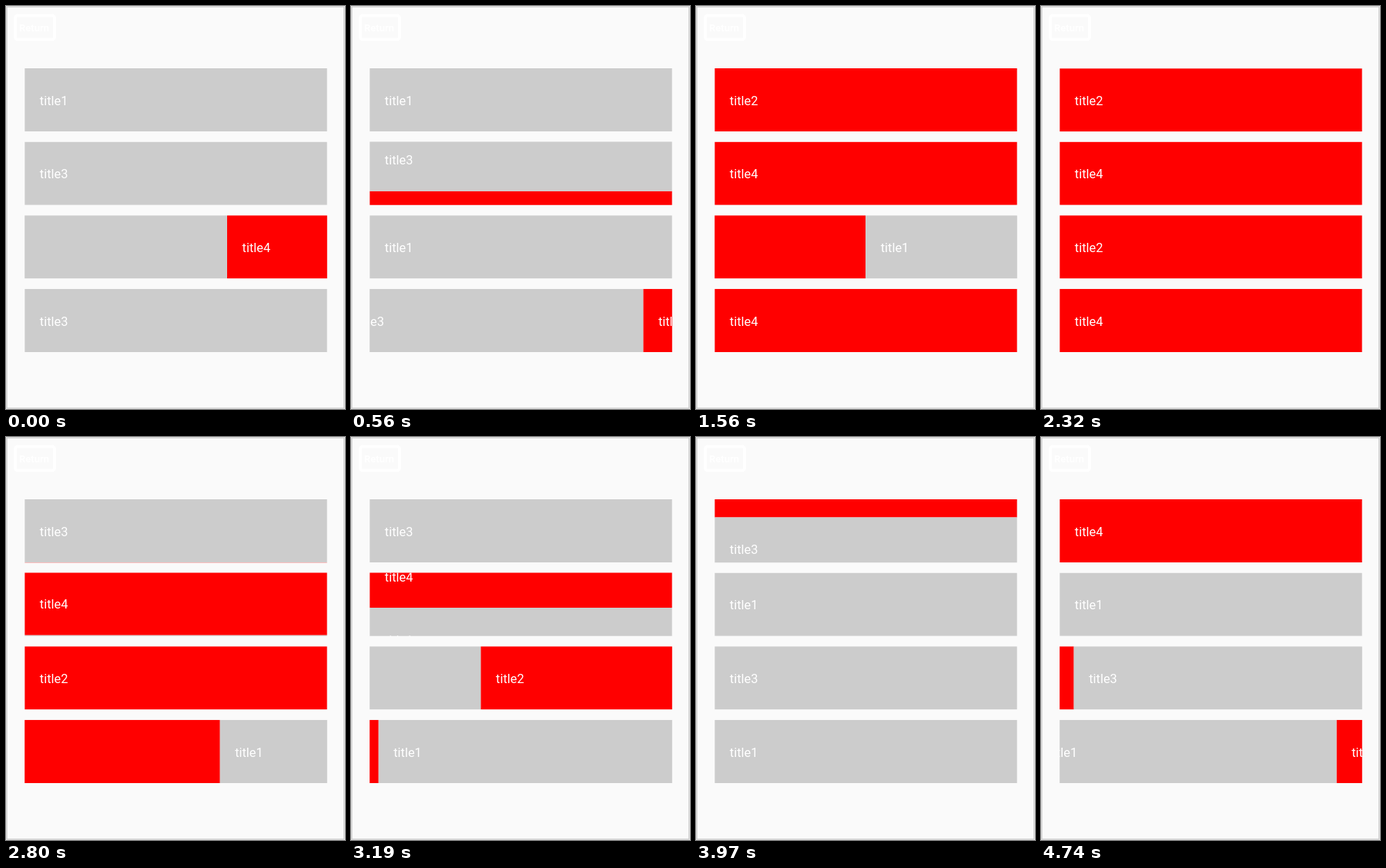
An HTML page with a canvas for the animation above (4.81 s loop, 440x524 px).

```html
<!DOCTYPE html>
<html lang="en">
<head>
<meta charset="utf-8">
<title>Carousels</title>
<style>
  html, body { margin: 0; width: 100%; height: 100%; overflow: hidden; background: #fafafa; }
  canvas { display: block; }
</style>
</head>
<body>
<canvas width="440" height="524"></canvas>
<script>
const ctx = document.querySelector('canvas').getContext('2d');
const LOOP = 4810, STEP = LOOP / 62;
const LEFT = 24.2, TOP = 81, WIDTH = 392.6, HEIGHT = 82.2, PITCH = 95.6;

// dx, dy: direction of travel; first: initial title; starts: when each slide begins
const carousels = [
  { dx: 0, dy: 1, first: 1, duration: 500, starts: [820, 2315, 3785] },
  { dx: 0, dy: -1, first: 3, duration: 1000, starts: [240, 2722] },
  { dx: 1, dy: 0, first: 4, duration: 600, starts: [-358, 1260, 2940, 4657] },
  { dx: -1, dy: 0, first: 3, duration: 800, starts: [391, 2476, 4590] }
];

const swing = x => 0.5 - 0.5 * Math.cos(Math.PI * Math.min(1, Math.max(0, x)));

function drawSlide(index, x, y) {
  const number = index % 4 + 1;
  ctx.fillStyle = number % 2 ? '#ccc' : '#f00';
  ctx.fillRect(x, y, WIDTH, HEIGHT);
  ctx.fillStyle = '#fff';
  ctx.font = '16.4px Roboto, sans-serif';
  ctx.fillText('title' + number, x + 19.6, y + 47.8);
}

function drawCarousel({ dx, dy, first, duration, starts }, row, time) {
  const top = TOP + PITCH * row;
  const position = starts.reduce((sum, start) => sum + swing((time - start) / duration), 0);
  const index = Math.floor(position), shift = position - index;
  ctx.save();
  ctx.beginPath();
  ctx.rect(LEFT, top, WIDTH, HEIGHT);
  ctx.clip();
  for (const [slide, offset] of [[index + 1, shift - 1], [index, shift]]) {
    if (Math.abs(offset) < 1) {
      drawSlide(first - 1 + slide, LEFT + dx * offset * WIDTH, top + dy * offset * HEIGHT);
    }
  }
  ctx.restore();
}

function drawFrame() {
  ctx.fillStyle = '#fafafa';
  ctx.fillRect(0, 0, 440, 524);
  ctx.strokeStyle = '#ccc';
  ctx.lineWidth = 1.4;
  ctx.strokeRect(1, 1, 437.8, 522);
}

function drawButton() {
  ctx.strokeStyle = ctx.fillStyle = '#fff';
  ctx.lineWidth = 4;
  ctx.beginPath();
  ctx.roundRect(12, 12.5, 51, 31, 3);
  ctx.stroke();
  ctx.font = 'bold 13px Roboto, sans-serif';
  ctx.fillText('Return', 17, 33);
}

let origin;
function render(now) {
  origin ??= now;
  const elapsed = (now - origin) % LOOP;
  // The picture advances in steps of about 78 ms
  const time = Math.min(61, Math.floor((elapsed + 10) / STEP)) * STEP + 8;
  drawFrame();
  drawButton();
  carousels.forEach((carousel, row) => drawCarousel(carousel, row, time));
  requestAnimationFrame(render);
}
requestAnimationFrame(render);
</script>
</body>
</html>
```
